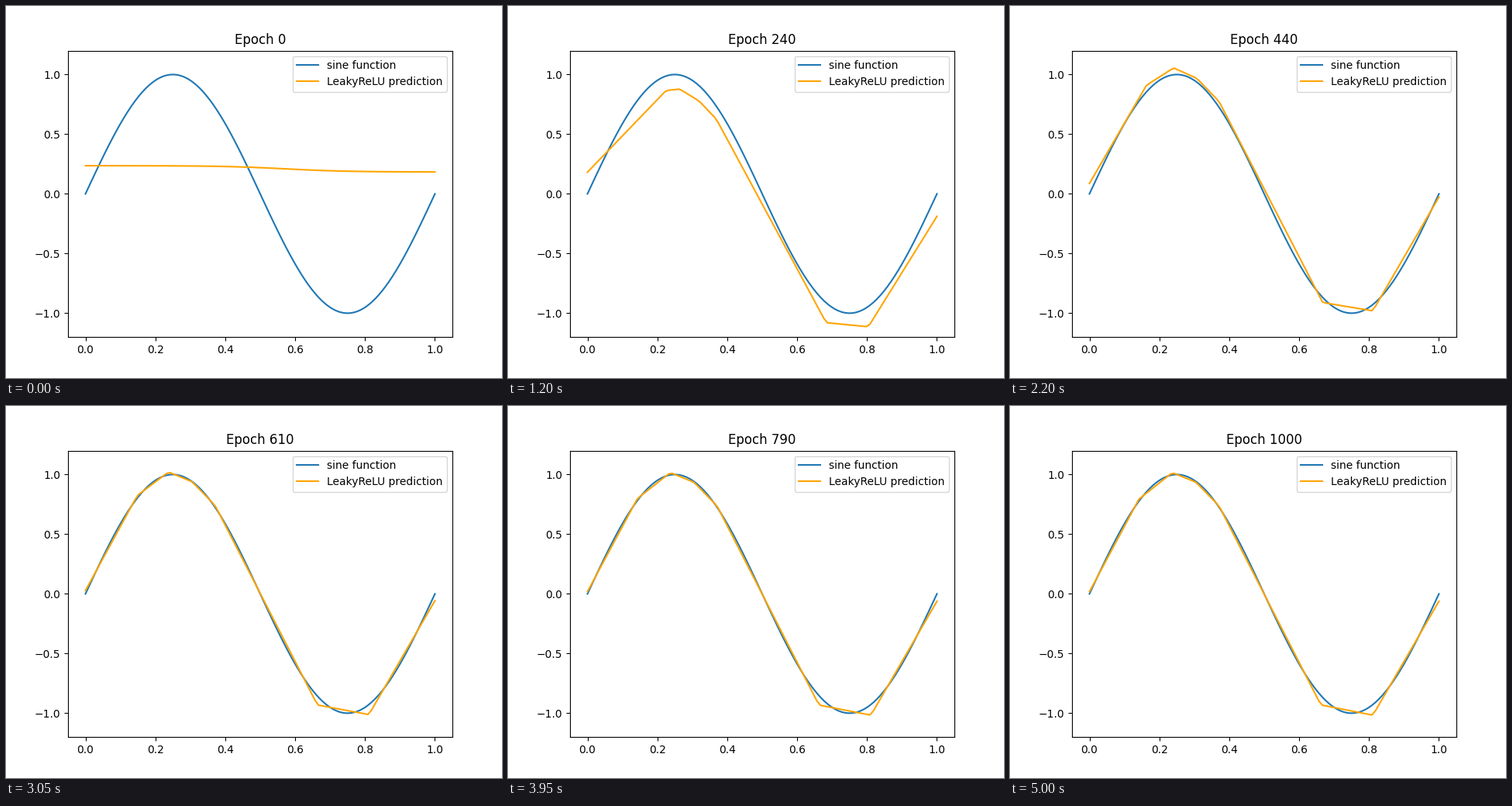
Animation, 640 px wide and 480 px high, one loop 5050 ms. Source, as a matplotlib script:

```python
import numpy as np
import matplotlib.pyplot as plt
from matplotlib.animation import FuncAnimation

FRAMES, INTERVAL, EPOCH_STEP = 101, 50, 10
HINGE_EPOCH = 140  # the fit is a rough three-part line here, then rounds off


def sine(x):
    return np.sin(2 * np.pi * x)


def bump(epoch, mid, width):
    return np.exp(-((epoch - mid) / width) ** 2)


# Corners of the fit: place at the hinge epoch, final place, slide time in
# epochs, and final height above the sine
EARLY_X = np.array([0, .305, .310, .345, .365, .703, .757, 1])
LATE_X = np.array([0, .141, .237, .305, .371, .662, .811, 1])
SLIDE = np.array([1, 150, 100, 100, 100, 150, 50, 1])
LATE_GAP = np.array([.018, .017, .019, -.006, .011, -.079, -.089, -.062])

# The left end settles more slowly than the rest
SETTLE = np.where(EARLY_X == 0, 92, 50)
EARLY_Y = np.interp(EARLY_X, [0, .345, .365, .703, .757, 1],
                    [.795, .641, .603, -.962, -.968, -.280])
EARLY_GAP = EARLY_Y - sine(EARLY_X)


def settling(epoch):
    """Corners slide to their final places while the fit swings and calms."""
    t = max(epoch - HINGE_EPOCH, 0)
    kx = LATE_X + (EARLY_X - LATE_X) * np.exp(-t / SLIDE)
    gap = LATE_GAP + (EARLY_GAP - LATE_GAP) * np.exp(-t / SETTLE)
    swing = .04 * bump(epoch, 450, 110) - .1 * bump(epoch, 245, 60)
    ripple = .025 * (epoch / 1000) ** 2 * np.sin(np.pi * (epoch - 610) / 30)
    return np.interp(x, kx, sine(kx) + gap) + swing - ripple * x


def prediction(epoch):
    start = .21 - .026 * np.tanh((x - .57) / .18)
    grown = np.sin(np.pi / 2 * min(epoch / HINGE_EPOCH, 1))
    dip = 1.2 * bump(epoch, 65, 25) * np.maximum(x - .5, 0)
    return start + (settling(epoch) - start) * grown - dip


x = np.linspace(0, 1, 100)
fig, ax = plt.subplots(figsize=(6.4, 4.8), dpi=100)
ax.plot(x, sine(x), label="sine function")
fit, = ax.plot(x, prediction(0), color="orange", label="LeakyReLU prediction")
ax.set_xlim(-.05, 1.05)
ax.set_ylim(-1.2, 1.2)
ax.legend(loc="upper right")
title = ax.set_title("Epoch 0")


def update(i):
    epoch = i * EPOCH_STEP
    fit.set_ydata(prediction(epoch))
    title.set_text(f"Epoch {epoch}")
    return fit, title


anim = FuncAnimation(fig, update, frames=FRAMES, interval=INTERVAL,
                     repeat=True, repeat_delay=0, blit=False)
plt.show()
```
